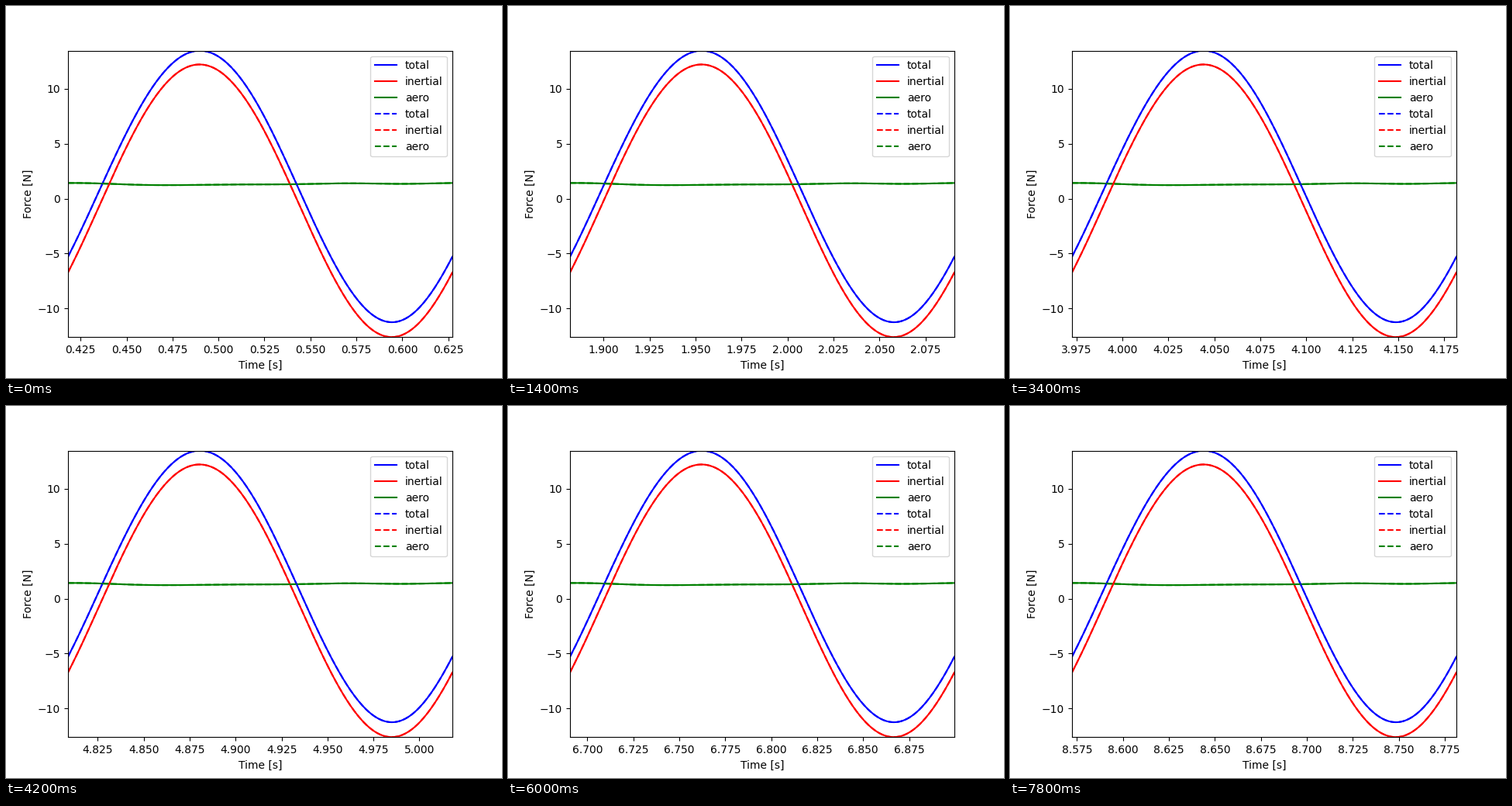
A matplotlib script that plays this animation: 640x480 px, repeating every 8000 ms.

```python
import numpy as np
import matplotlib.pyplot as plt
from matplotlib.animation import FuncAnimation

PERIOD = 0.20908      # seconds per force cycle, one cycle per frame
FIRST_CYCLE = 2
FRAMES = 40
INTERVAL = 200
COLORS = {"total": "b", "inertial": "r", "aero": "g"}

# Aerodynamic force at eight even phases, joined by a trigonometric curve
AERO = [1.43, 1.33, 1.235, 1.27, 1.30, 1.34, 1.40, 1.35]


def aero_force(phase):
    coef = np.fft.rfft(AERO) / len(AERO)
    force = np.full_like(phase, coef[0].real)
    for n, c in enumerate(coef[1:], 1):
        weight = 1 if n == len(AERO) // 2 else 2
        force += weight * (c * np.exp(2j * np.pi * n * phase)).real
    return force


def inertial_force(phase):
    angle = 2 * np.pi * (phase - 0.3421)
    return 12.41 * np.cos(angle) - 0.19 * np.cos(2 * angle)


phase = np.linspace(0, 1, 201)
inertial = inertial_force(phase)
aero = aero_force(phase)
forces = {"total": inertial + aero, "inertial": inertial, "aero": aero}

fig, ax = plt.subplots(figsize=(6.4, 4.8), dpi=100)
lines = [
    ax.plot(phase, forces[name], color=color, linestyle=style, label=name)[0]
    for style in ("-", "--")
    for name, color in COLORS.items()
]
ax.set_ylim(-12.6, 13.48)
ax.set_xlabel("Time [s]")
ax.set_ylabel("Force [N]")
ax.ticklabel_format(axis="x", useOffset=False)
ax.legend(loc="upper right")


def update(frame):
    start = (FIRST_CYCLE + frame) * PERIOD
    for line in lines:
        line.set_xdata(start + phase * PERIOD)
    ax.set_xlim(start, start + PERIOD)
    return lines


anim = FuncAnimation(fig, update, frames=FRAMES, interval=INTERVAL,
                     init_func=lambda: update(0), repeat=True, repeat_delay=0)
plt.show()
```
